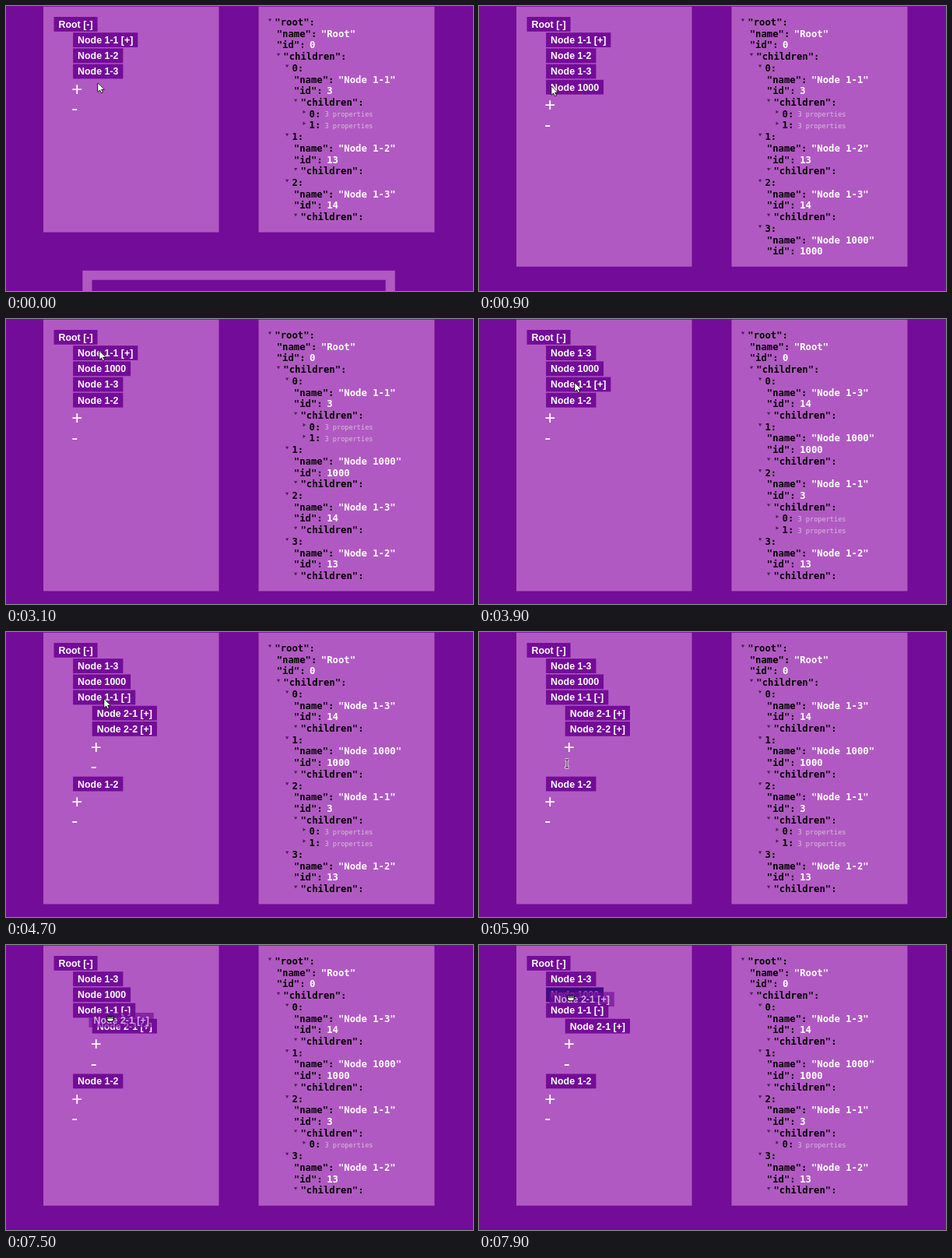
Write an HTML page with a canvas that moves like this. It is 600x366 px and loops after 8000 ms.

```html
<!DOCTYPE html>
<html lang="en">
<head>
<meta charset="utf-8">
<title>Tree editor</title>
<style>
html, body { margin: 0; width: 100%; height: 100%; overflow: hidden; background: #730c98; }
canvas { display: block; }
</style>
</head>
<body>
<canvas id="stage" width="600" height="366"></canvas>
<script>
const ctx = document.getElementById('stage').getContext('2d');
const LOOP = 8000, TICK = 100;
const ADD = 900, SWAP_1 = 2200, SWAP_2 = 3900, OPEN = 4700, REMOVE = 6700;
const BG = '#730c98', PANEL = '#b159c2';
const SANS = '"Liberation Sans", Arial, sans-serif';
const MONO = '"DejaVu Sans Mono", monospace';
const NODE_FONT = `bold 12.4px ${SANS}`, BUTTON_FONT = `24px ${SANS}`;
const KEY_FONT = `bold 12.25px ${MONO}`, NOTE_FONT = `8.6px ${MONO}`;
const NODE_H = 18.8, NODE_STEP = 20.2, NODE_INDENT = 24.6;
const ROW = 14.72, ROW_INDENT = 11.05, CHAR = 7.375;
const GRAB_X = 27.5, GRAB_Y = 7.4;

const node = (name, id) => ({ name, id });
const n11 = node('Node 1-1', 3), n12 = node('Node 1-2', 13), n13 = node('Node 1-3', 14);
const added = node('Node 1000', 1000);

// Pointer moves; a drag lasts until the next move begins
const move = (from, to, x, y, extra) => ({ from, to, x, y, ...extra });
const moves = [
  move(0, 0, 118, 99),
  move(100, 700, 93, 103, { beam: true }),
  move(ADD, 1300, 113, 102),
  move(1400, 2000, 110.5, 68.5, { drag: 'Node 1000' }),
  move(SWAP_1, 2400, 111, 64),
  move(2700, 3100, 120, 41),
  move(3300, 3800, 123, 82, { drag: 'Node 1-1 [+]' }),
  move(SWAP_2, 4300, 126, 86),
  move(4800, 5600, 134, 119),
  move(5700, 5900, 113, 169, { beam: true }),
  move(6100, 6500, 115, 172),
  move(REMOVE, 7300, 138, 101),
  move(7400, 7900, 118, 67.7, { drag: 'Node 2-1 [+]' }),
];

function pointerAt(t) {
  const i = moves.findLastIndex(m => m.from <= t);
  const m = moves[i], prev = moves[Math.max(i - 1, 0)];
  const k = m.to > t ? (t - m.from) / (m.to - m.from) : 1;
  return {
    x: prev.x + (m.x - prev.x) * k,
    y: prev.y + (m.y - prev.y) * k,
    drag: m.drag,
    beam: m.beam && k === 1,
  };
}

function swap(list, i, j) {
  [list[i], list[j]] = [list[j], list[i]];
}

function topLevel(t) {
  const list = [n11, n12, n13];
  if (t >= ADD) list.push(added);
  if (t >= SWAP_1) swap(list, 1, 3);
  if (t >= SWAP_2) swap(list, 0, 2);
  return list;
}

function rect(x, y, w, h, color) {
  ctx.fillStyle = color;
  ctx.fillRect(x, y, w, h);
}

function text(s, x, y, font, color) {
  ctx.font = font;
  ctx.fillStyle = color;
  ctx.fillText(s, x, y);
}

function nodeWidth(label) {
  ctx.font = NODE_FONT;
  return ctx.measureText(label).width + 12;
}

function drawNode(label, x, y, dim) {
  rect(x, y, nodeWidth(label), NODE_H, dim ? '#410a83' : BG);
  text(label, x + 6, y + 13.8, NODE_FONT, dim ? '#9a5cb8' : '#fff');
}

function drawTree(top, kids, open, pointer) {
  let y = 14;
  const put = (label, depth) => {
    const x = 61.5 + depth * NODE_INDENT;
    const dx = pointer.x - x, dy = pointer.y - y;
    const target = pointer.drag && pointer.drag !== label &&
      dx >= 0 && dx <= nodeWidth(label) && dy >= 0 && dy <= NODE_H;
    drawNode(label, x, y, target);
    y += NODE_STEP;
  };
  const buttons = depth => {
    const x = 59.6 + depth * NODE_INDENT;
    text('+', x, y + 20.3, BUTTON_FONT, '#fff');
    text('-', x, y + 44.5, BUTTON_FONT, '#fff');
    y += 50.5;
  };
  put('Root [-]', 0);
  for (const n of top) {
    put(n === n11 ? `${n.name} [${open ? '-' : '+'}]` : n.name, 1);
    if (n === n11 && open) {
      for (let k = 1; k <= kids; k++) put(`Node 2-${k} [+]`, 2);
      buttons(2);
    }
  }
  buttons(1);
}

// Rows of the data view: depth, key, leaf value, note on a folded branch
function jsonRows(top, kids, t) {
  const rows = [];
  const add = (depth, key, value, note) => rows.push({ depth, key, value, note });
  const fields = (depth, name, id, hasKids) => {
    add(depth, '"name":', `"${name}"`);
    add(depth, '"id":', String(id));
    if (hasKids) add(depth, '"children":');
  };
  add(0, '"root":');
  fields(1, 'Root', 0, true);
  top.forEach((n, i) => {
    add(2, i + ':');
    fields(3, n.name, n.id, n !== added || t >= SWAP_1);
    if (n === n11) for (let k = 0; k < kids; k++) add(4, k + ':', '', '3 properties');
  });
  return rows;
}

function triangle(x, y, folded) {
  ctx.save();
  ctx.translate(x, y);
  if (folded) ctx.rotate(-Math.PI / 2);
  ctx.beginPath();
  ctx.moveTo(-2.2, -1.7);
  ctx.lineTo(2.2, -1.7);
  ctx.lineTo(0, 2);
  ctx.fillStyle = '#4a2355';
  ctx.fill();
  ctx.restore();
}

function drawJson(rows) {
  rows.forEach(({ depth, key, value, note }, i) => {
    const mid = 20.5 + i * ROW, base = mid + 4.4;
    const x = 345.3 + depth * ROW_INDENT - (value ? 8.7 : 0);
    const end = x + key.length * CHAR;
    if (!value) triangle(339 + depth * ROW_INDENT, mid - 2.2, note);
    text(key, x, base, KEY_FONT, '#000');
    if (value) text(value, end + 5.5, base, KEY_FONT, '#fff');
    if (note) text(note, end + 5.2, base - 0.4, NOTE_FONT, '#d2c0d6');
  });
}

const arrow = new Path2D('M0 0V11.2L2.7 8.8L4.5 12.6L6.3 11.8L4.6 8.1H8.2Z');
const beam = new Path2D('M-2.5 -5H2.5M0 -5V5M-2.5 5H2.5');
const hand = new Path2D();
hand.roundRect(-4, -1.5, 8, 5, 2);
for (let x = -3; x <= 3; x += 2) hand.roundRect(x - 1, -2.6, 2, 3, 1);

function drawPointer({ x, y, drag, beam: overText }) {
  const shape = drag ? hand : overText ? beam : arrow;
  ctx.save();
  ctx.translate(x, y);
  ctx.lineJoin = 'round';
  const outline = (width, color) => {
    ctx.lineWidth = width;
    ctx.strokeStyle = color;
    ctx.stroke(shape);
  };
  if (shape === beam) outline(3, '#fff');
  outline(shape === hand ? 1.8 : 1, '#000');
  if (shape !== beam) {
    ctx.fillStyle = '#fff';
    ctx.fill(shape);
    outline(0.5, '#000');
  }
  ctx.restore();
}

function draw(t) {
  const top = topLevel(t), kids = t < REMOVE ? 2 : 1;
  const rows = jsonRows(top, kids, t);
  const pointer = pointerAt(t);
  const height = 24.8 + rows.length * ROW;

  rect(0, 0, 600, 366, BG);
  rect(48, 0.8, 225.5, height, PANEL);
  rect(324.5, 0.8, 226, height, PANEL);
  rect(98.3, height + 50, 401.5, 200, PANEL);
  rect(110.5, height + 62, 377.2, 200, BG);

  drawTree(top, kids, t >= OPEN, pointer);
  drawJson(rows);

  if (pointer.drag) {
    ctx.globalAlpha = 0.66;
    drawNode(pointer.drag, pointer.x - GRAB_X, pointer.y - GRAB_Y);
    ctx.globalAlpha = 1;
  }
  drawPointer(pointer);
}

const start = performance.now();
function tick() {
  const t = (performance.now() - start) % LOOP;
  draw(Math.floor(t / TICK) * TICK);
  requestAnimationFrame(tick);
}
tick();
</script>
</body>
</html>
```
